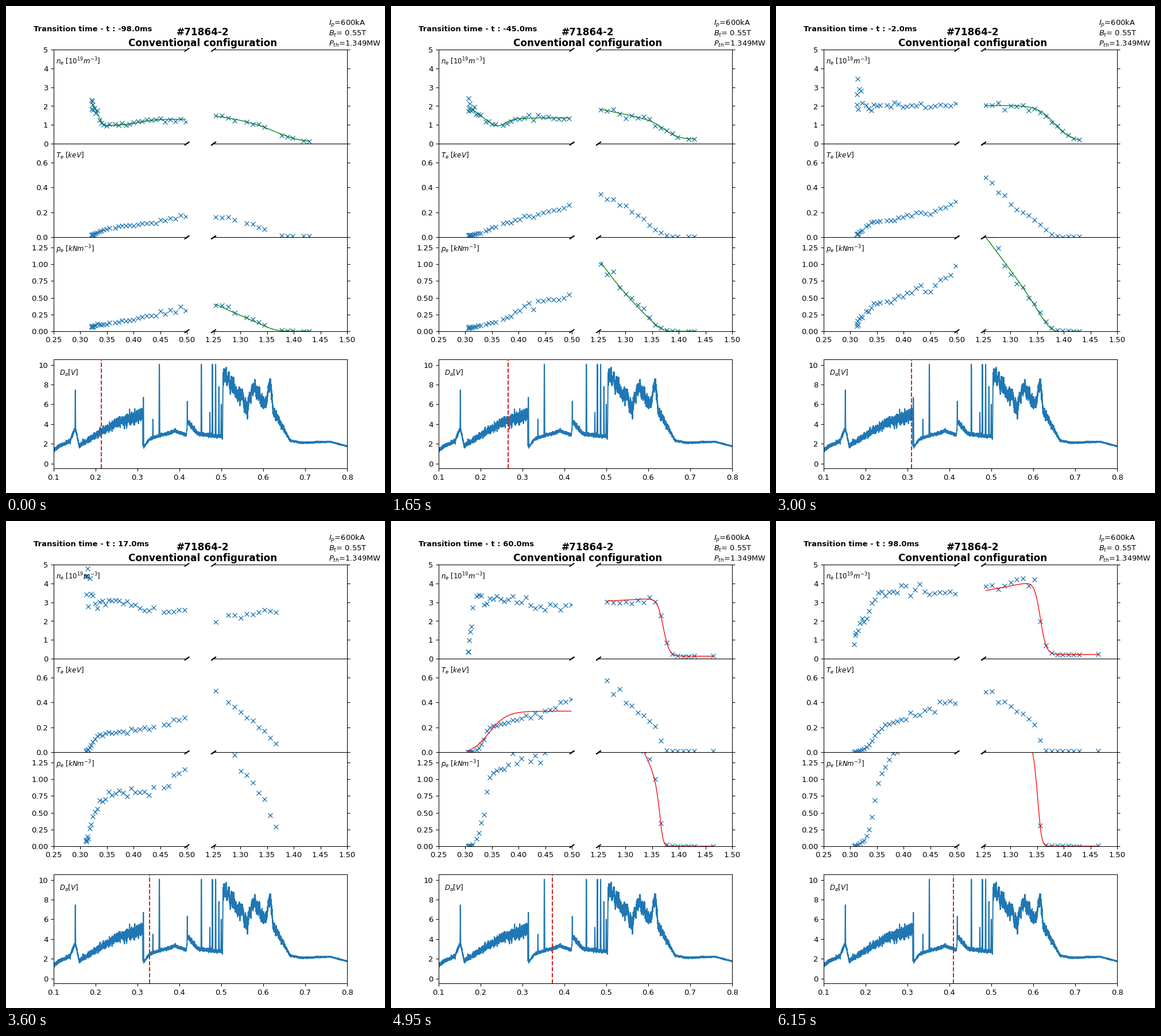
Recreate the animation shown at these times as a matplotlib script. Size 660x849 px, loop 6300 ms.

```python
import numpy as np
import matplotlib.pyplot as plt
from matplotlib.animation import FuncAnimation

W, H, DPI = 660, 849, 94.3
FRAMES, INTERVAL = 42, 150
ONSET = .3116            # time of the transition on the light signal
BLUE = "C0"


# ---------- plasma profiles ----------

TIMES = [-98, -79, -45, -21, 17, 60, 98]

# start, value there, fall, end of the edge layer, its width, core values
N_LEFT = [(.3215, 2.2, 48, .342, .008, .97, 1.3),
          (.311, 2.22, 31, .363, .013, 1.25, 1.29),
          (.306, 2, 22, .368, .016, 1.34, 1.37),
          (.3145, 1.9, 45, .332, .008, 1.1, 1.45),
          (.311, 4.1, 60, .328, .008, 2.95, 2.55),
          (.3055, .2, -180, .314, .005, 3.15, 2.75),
          (.3075, 1.3, -30, .345, .02, 3.75, 3.5)]
# step height, its depth and width, rise towards the core
T_LEFT = [(.08, .012, .02, .11), (.09, .04, .04, .12), (.13, .045, .045, .12),
          (.11, .01, .02, .17), (.145, .012, .01, .14), (.21, .03, .012, .21),
          (.22, .037, .018, .22)]
# top, slope, place and width of the drop, floor
N_RIGHT = [(1.48, -4, 1.375, .05, .05), (1.68, -5, 1.38, .035, .24),
           (1.83, -6, 1.378, .025, .24), (1.81, -2, 1.375, .05, .08),
           (2.25, 2, 1.39, .012, .15), (3.05, 1.6, 1.371, .011, .13),
           (3.63, 5.4, 1.356, .011, .22)]
T_RIGHT = [(.18, -1.1, 1.362, .025, .01), (.24, -1.6, 1.375, .025, .01),
           (.36, -2.7, 1.373, .025, .01), (.38, -2.8, 1.37, .025, .01),
           (.5, -3.7, 1.39, .02, .01), (.56, -3.4, 1.367, .007, .01),
           (.5, -2.9, 1.355, .008, .01)]


def at_time(t, rows):
    return [np.interp(t, TIMES, col) for col in zip(*rows)]


def ramp(x, mid, width):
    return .5 * (1 + np.tanh((x - mid) / width))


def edge_layer(x, start, value, fall, mid, width, inner, outer):
    edge = value - fall * (x - start)
    core = inner + (outer - inner) * ramp(x, .41, .03)
    s = ramp(x, mid, width)
    return edge * (1 - s) + core * s


def pedestal(x, top, slope, mid, width, floor):
    core = top + slope * (x - 1.2545) - floor
    return core * ramp(-x, -mid, width) + floor


def left_profile(x, t):
    n_args = at_time(t, N_LEFT)
    step, mid, width, rise = at_time(t, T_LEFT)
    depth = x - n_args[0]
    temp = step * ramp(depth, mid, width) + rise * (depth / .19) ** 2
    return edge_layer(x, *n_args), temp


def right_profile(x, t):
    return (pedestal(x, *at_time(t, N_RIGHT)),
            pedestal(x, *at_time(t, T_RIGHT)))


def measure(i, t):
    """Scattered points (x, n, T) on the left and on the right."""
    rng = np.random.default_rng(300 + i)
    start = at_time(t, N_LEFT)[0]

    # even steps along a line of sight that touches the radius `start`
    s = np.sqrt(rng.uniform(.494, .499)**2 - start**2) - .0128 * np.arange(31)
    xl = np.sqrt(start**2 + s**2)
    k = np.arange(18)
    xr = 1.2541 + .0119 * k - .0000617 * k**2
    xr[-1] = 1.465

    keep_l = rng.random(len(xl)) > .07
    keep_r = rng.random(len(xr)) > .04
    keep_r[-1] = rng.random() > .5
    if abs(t - 17) < 12:
        keep_r &= xr < 1.375
    xl, xr = xl[keep_l], xr[keep_r]

    def scatter(x, n, temp):
        wide = .05 + .18 * np.exp(-(x - start) / .006)
        n = n * (1 + wide * rng.standard_normal(len(x)))
        temp = temp * (1 + .05 * rng.standard_normal(len(x)))
        return x, np.maximum(n, .05), np.maximum(temp, .004)

    return (scatter(xl, *left_profile(xl, t)),
            scatter(xr, *right_profile(xr, t)))


def fits(t, xl, xr):
    """Curves shown at time t, as {(row, side): (x, y)}."""
    out = {}
    cl = np.linspace(xl.min(), min(xl.max(), .5), 200)
    cr = np.linspace(xr.min(), xr.max(), 300)
    nl, tl = left_profile(cl, t)
    nr, tr = right_profile(cr, t)
    if t < 0 or t > 30:
        out[0, 1] = cr, nr
        out[2, 1] = cr, 1.602 * nr * (tr - .01)
    if t < -40:
        out[0, 0] = cl, nl
    if -85 < t < -70:
        out[2, 0] = cl, 1.602 * nl * tl
    if 45 < t < 75:
        out[1, 0] = cl, .345 * ramp(cl, .345, .033) - .015
    return out


# ---------- light signal ----------

def signal():
    rng = np.random.default_rng(5)
    x = np.linspace(.1, .8, 5001)
    base = [(.1, 1.3), (.115, 1.8), (.14, 2.3), (.152, 3.6), (.162, 1.8),
            (.2, 2.85), (.25, 4.1), (.313, 5), (.3136, 1.6), (.33, 2.5),
            (.36, 2.9), (.39, 3.3), (.417, 2.9), (.42, 4.2), (.445, 3),
            (.503, 2.7), (.5045, 9), (.54, 7), (.55, 7), (.563, 5.3),
            (.573, 7.7), (.605, 5.8), (.617, 8.2), (.625, 5.2), (.665, 2.3),
            (.69, 2.1), (.76, 2.2), (.8, 1.75)]
    sigma = [(.1, .08), (.2, .15), (.313, .33), (.314, .06), (.41, .09),
             (.425, .14), (.45, .08), (.504, .1), (.505, .36), (.62, .28),
             (.665, .05), (.8, .02)]
    spikes = [(.1523, 7.5), (.3145, 6.7), (.3372, 4.5), (.3525, 11),
              (.4192, 6.3), (.4527, 11), (.473, 5.2), (.479, 11),
              (.4866, 11), (.4945, 7.8), (.5, 6)]
    y = np.interp(x, *zip(*base))
    wobble = np.convolve(rng.standard_normal(len(x)), np.ones(25) / 5, "same")
    y += .25 * wobble * (x > .505) * np.clip((.65 - x) * 20, 0, 1)
    y += np.interp(x, *zip(*sigma)) * rng.standard_normal(len(x))
    for at, peak in spikes:
        y = np.maximum(y, peak * np.exp(-((x - at) / .0007) ** 2))
    return x, np.minimum(y, 10.05)


# ---------- stage ----------

fig = plt.figure(figsize=((W + .001) / DPI, (H + .001) / DPI), dpi=DPI)


def panel(x0, x1, y0, y1):
    return fig.add_axes([x0 / W, 1 - y1 / H, (x1 - x0) / W, (y1 - y0) / H])


def write(x, y, s, **kw):
    return fig.text(x / W, 1 - y / H, s, **kw)


SIDES = [(82.5, 315), (361.5, 594)]
ROWS = [(5, np.arange(6), r"$n_e\ [10^{19}m^{-3}]$"),
        (.75, np.arange(0, .7, .2), r"$T_e\ [keV]$"),
        (1.4, np.arange(0, 1.3, .25), r"$p_e\ [kNm^{-3}]$")]
TOP, STEP = 76.4, 163.5
D = .015                 # half size of the axis break marks
points, curves = {}, {}

for r, (limit, ticks, label) in enumerate(ROWS):
    for c, (x0, x1) in enumerate(SIDES):
        ax = panel(x0, x1, TOP + r * STEP, TOP + (r + 1) * STEP)
        ax.set_xlim(.25 + c, .5 + c)
        ax.set_ylim(0, limit)
        ax.set_yticks(ticks)
        ax.set_xticks(np.arange(.25, .51, .05) + c if r == 2 else [])
        if r == 2:
            ax.xaxis.set_major_formatter("{x:.2f}")
        ax.spines["left" if c else "right"].set_visible(False)
        if c:
            ax.yaxis.tick_right()
            ax.tick_params(axis="y", labelright=False)
        else:
            ax.text(.02, .85, label, fontsize=9, transform=ax.transAxes)
        for y in (0, 1):
            ax.plot([1 - c - D, 1 - c + D], [y - D, y + D], "k", lw=1.5,
                    transform=ax.transAxes, clip_on=False, zorder=5)
        points[r, c], = ax.plot([], [], "x", color=BLUE, ms=6)
        curves[r, c], = ax.plot([], [], lw=1)

light = panel(82.5, 594, 616.4, 806.5)
light.plot(*signal(), color=BLUE, lw=1.5)
light.set_xlim(.1, .8)
light.set_ylim(-.52, 10.53)
light.set_yticks(range(0, 11, 2))
light.text(.02, .857, r"$D_{\alpha}[V]$", fontsize=9,
           transform=light.transAxes)
marker = light.axvline(.2, color="#d61a1a", ls="--", lw=1.5, zorder=4)

clock = write(48, 44, "", fontsize=10, weight="bold")
for y, line in [(50.5, "#71864-2"), (70, "Conventional configuration")]:
    write(343, y, line, fontsize=12.9, weight="bold", ha="center")
for y, line in [(33.5, "$I_p$=600kA"), (52, "$B_t$= 0.55T"),
                (69.5, "$P_{th}$=1.349MW")]:
    write(561.5, y, line, fontsize=9.9)


def draw(i):
    t = round(-98 + 4.785 * i)
    clock.set_text(f"Transition time - t : {t:.1f}ms")
    marker.set_xdata([ONSET + t / 1000] * 2)
    sides = measure(i, t)
    for c, (x, n, temp) in enumerate(sides):
        for r, y in enumerate((n, temp, 1.602 * n * temp)):
            points[r, c].set_data(x, y)
    shown = fits(t, sides[0][0], sides[1][0])
    for key, curve in curves.items():
        curve.set_data(*shown.get(key, ([], [])))
        curve.set_color("green" if t < 0 else "red")
    return [clock, marker, *points.values(), *curves.values()]


anim = FuncAnimation(fig, draw, frames=FRAMES, interval=INTERVAL,
                     repeat=True, repeat_delay=0, blit=False)
plt.show()
```
